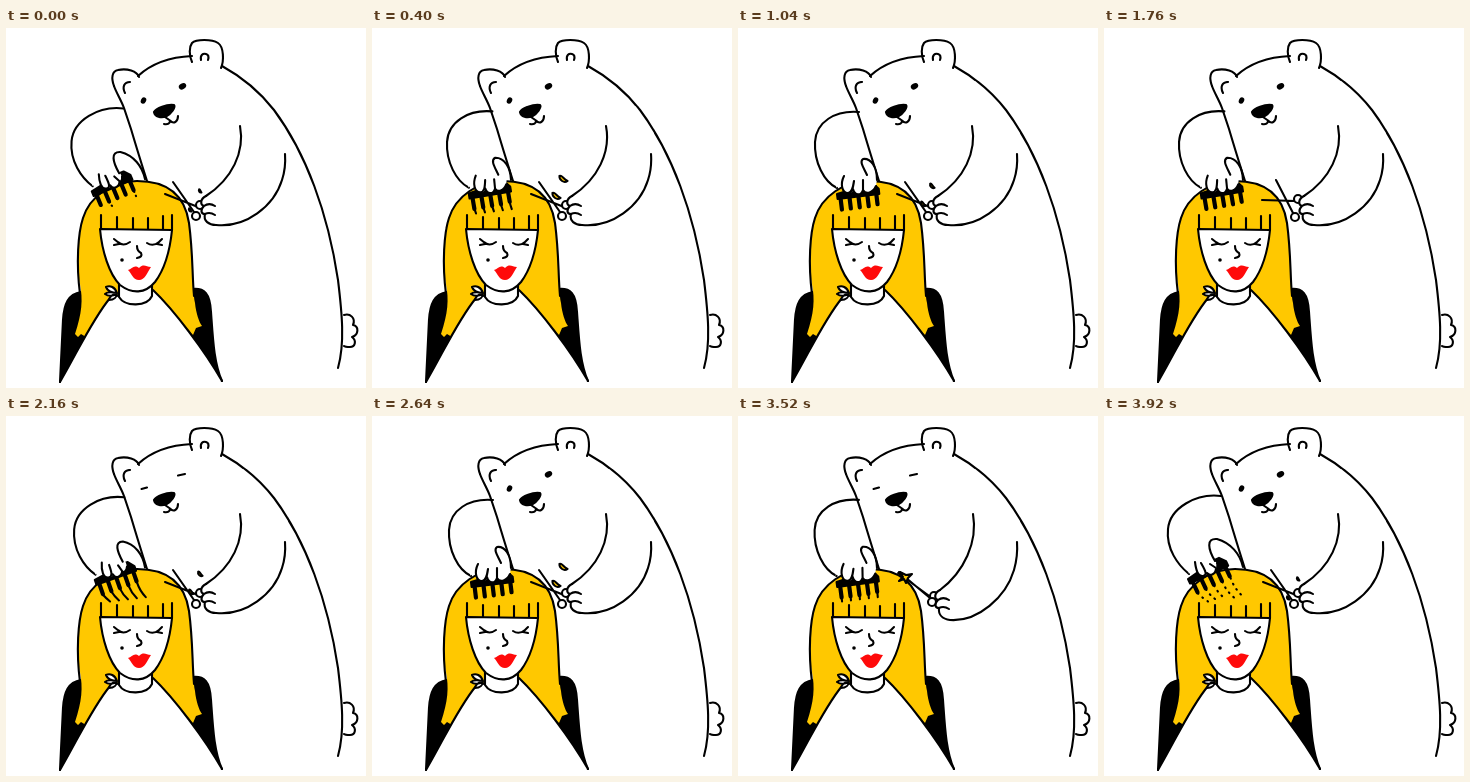
An HTML page that plays this animation: 360x360 px, repeating every 4000 ms.

```html
<!DOCTYPE html>
<html lang="en">
<head>
<meta charset="utf-8">
<title>Bear hairdresser</title>
<style>
  html, body { margin: 0; width: 100%; height: 100%; overflow: hidden; background: #fff; }
  svg { display: block; width: 100vw; height: 100vh; }
  .ink { fill: none; stroke: #000; stroke-width: 2.1; stroke-linecap: round; stroke-linejoin: round; }
  .white { fill: #fff; }
  .hair { fill: #ffc800; }
  .solid { fill: #000; }
  .bare { stroke: none; }
  .teeth { stroke-width: 4.2; }
</style>
</head>
<body>
<svg viewBox="0 0 360 360">
  <!-- bear -->
  <g class="ink">
    <path d="M133 49C131 43 121 40 112 42C106 43 105 50 108 58M119 65C116 59 118 54 124 54"/>
    <path d="M132 48C145 36 164 29 186 28"/>
    <path d="M186 34C183 27 183 19 186 15C190 11 206 11 212 15C218 19 218 33 215 40M195 32C194 27 197 25 200 26C203 27 203 29 202 32"/>
    <path d="M216 38C236 49 254 64 268 82C300 125 322 185 332 252C336 285 339 315 332 340"/>
    <path d="M338 287C344 285 350 290 347 297C353 298 353 307 346 309C351 313 349 319 344 319C341 319 339 319 338 318"/>
    <g id="open" class="solid bare">
      <ellipse cx="137.500" cy="72.500" rx="2.600" ry="3.400" transform="rotate(25 137.500 72.500)"/>
      <ellipse cx="176.500" cy="58.300" rx="3.900" ry="2.900" transform="rotate(-30 176.500 58.300)"/>
    </g>
    <path id="shut" d="M135.500 73L141 71.500M172 59.500L179 58"/>
    <path class="solid" d="M148 84C150 80 161 76 168 77C170 79 165 86 160 88.500C155 90 149 89 148 84Z"/>
    <path d="M159 89L164 92.500Q164 97 158 96M164 92.500C168 97 172 93 172 88"/>
    <path id="arm" class="white"/>
    <path d="M108 58C110 64 115 72 118 80L125 101C130 118 135 134 141 153"/>
  </g>

  <!-- customer -->
  <g class="ink">
    <path class="solid" d="M75 264C62 266 58 276 57 292L54 354L100 282ZM187 261C198 260 204 265 205 284C207 312 208 335 216 353L150 268Z"/>
    <path class="hair bare" d="M69 306C76 285 77 272 74 256C70 235 72 205 77 190C84 168 106 153 131 153C162 153 179 168 183 195C187 225 186 258 189 275C190 285 193 294 196 298L190 300L187 307L181 302L80 309L75 306L72 309Z"/>
    <path d="M74 266C70 235 72 205 77 190C84 168 106 153 131 153C162 153 179 168 183 195C187 225 186 245 188 268"/>
    <path class="white" d="M54 354C72 323 86 292 104 270L114 267L147 262C168 282 199 323 216 353"/>
    <path class="white" d="M113 256V269C119 279 141 279 146 268V256Z"/>
    <path class="white" d="M94 201C96 223 103 246 114 257C126 266 139 266 149 254C158 242 164 222 166 202Z"/>
    <path d="M95 187V201M111 189V201M127 190V201M142 190V201M157 188V201M166 187V202"/>
    <path class="white" d="M111 265C109 259 104 257 100 259C102 264 106 265 111 265C106 264 101 264 99 266C103 269 108 268 111 265C107 266 103 269 103 272C108 272 111 269 111 265"/>
    <path d="M112 214Q117 219 124 214M108 211L113 215M108 217L113 216M141 215Q147 219 153 214M156 211L152 215M156 217L151 216"/>
    <path d="M131 218Q131 223 135 225Q137 229 131 230"/>
    <circle class="solid bare" cx="116" cy="232" r="1.800"/>
    <path class="bare" fill="#ff0a0a" d="M122 242C126 241 128 236 133 240C138 235 140 239 145 239C141 245 139 252 133 252C127 252 126 246 122 242Z"/>
  </g>

  <!-- comb and combing paw -->
  <path id="trail" class="ink"/>
  <g id="comb" class="ink">
    <path class="solid" d="M0 0L12 -2L28 -6H37L42 0V5H0Z"/>
    <path class="teeth" d="M3 4V16M12 4V16M21 4V16M30 4V16M39 4V15"/>
  </g>
  <path id="paw" class="white"/>
  <path id="fingers" class="ink"/>

  <!-- scissors and cutting arm -->
  <g class="ink">
    <path id="blades"/>
    <circle id="ringA" r="4" class="white"/><circle id="ringB" r="4" class="white"/>
  </g>
  <path id="tuft" class="ink hair" d="M161 165L165 161L162 156L168 159L174 158L170 162L168 167L166 163Z"/>
  <g id="bits" class="ink hair">
    <path d="M-6 -3C-3 -6 0 0 7 1C3 6 -5 3 -6 -3Z"/><path d="M-6 -3C-3 -6 0 0 7 1C3 6 -5 3 -6 -3Z"/>
  </g>
  <g class="ink">
    <g id="grip">
      <path class="white bare" d="M199 169C193 172 194 177 198 178C194 181 195 185 199 186C197 190 201 195 209 195L214 165Z"/>
      <path d="M200 168C194 171 194 177 198 178C202 175 206 176 209 178M198 178C194 182 195 186 199 186C203 184 206 185 209 187"/>
    </g>
    <path id="sleeve"/>
  </g>
</svg>
<script>
const STEP = 80, FRAMES = 50;
const $ = id => document.getElementById(id);
const set = (id, attrs) => { for (const k in attrs) $(id).setAttribute(k, attrs[k]); };
const show = (id, on) => { $(id).style.display = on ? '' : 'none'; };
const lerp = (a, b, u) => a + (b - a) * u;

// Blend two paths that share the same commands.
function blend([a, b], u) {
  const to = b.match(/-?[\d.]+/g);
  let i = 0;
  return a.replace(/-?[\d.]+/g, n => lerp(+n, +to[i++], u).toFixed(2));
}

// Each pair: stroke start, stroke end.
const ARM = [
  'M121 84C97 82 78 94 77 114C76 134 86 154 99 160',
  'M117 80C92 77 66 92 64 113C62 133 74 149 85 158'];
const PAW = [
  'M98 160L106 148C102 156 104 165 110 165C114 165 115 163 115 161C117 168 123 168 125 162C128 167 135 165 138 158L139 151C138 139 133 130 125 131L100 138Z',
  'M85 158L91 146C92 154 94 161 99 160C104 159 102 158 103 157C106 161 112 158 112 152C113 153 114 150 113 147L111 145C104 133 102 122 113 123L80 138Z'];
const FINGERS = [
  'M106 148C102 156 104 165 110 165C114 165 115 160 116 153M115 161C117 168 123 168 125 162L125 152M125 162C128 167 135 165 138 158M139 152C139 139 133 130 125 131C121 134 126 140 129 147',
  'M91 146C92 154 94 161 99 160C104 159 101 154 97 147M103 157C106 161 112 158 112 152L106 148M112 152C113 153 114 150 113 147M139 151C136 138 127 127 113 123C102 122 104 133 111 145'];

// Each pair: scissors open, scissors closed.
const SLEEVE = [
  'M234 98C239 124 226 151 200 168M199 186C197 193 203 197 210 197C240 200 268 178 276 152Q280 140 279 126',
  'M235 98C240 126 226 156 202 174M201 192C200 199 205 203 212 204C240 206 268 181 276 154Q280 140 279 126'];

// Comb progress over its ten-step cycle: back, then a slower stroke.
const STROKE = [.88, .5, .15, 0, .03, .15, .38, .68, .9, 1];

function combPose(u) {
  return { x: lerp(99, 84, u), y: lerp(166, 163, u), a: lerp(-7, -25, u) };
}

function tip(u, i) {
  const p = combPose(u), r = p.a * Math.PI / 180, x = 3 + 9 * i, y = 17;
  return [p.x + x * Math.cos(r) - y * Math.sin(r), p.y + x * Math.sin(r) + y * Math.cos(r)];
}

function drawComb(phase) {
  const u = STROKE[phase], p = combPose(u), fading = phase === 0;
  set('arm', { d: blend(ARM, u) });
  set('paw', { d: blend(PAW, u) });
  set('fingers', { d: blend(FINGERS, u) });
  set('comb', { transform: `translate(${p.x} ${p.y}) rotate(${p.a})` });
  let d = '';
  for (let i = 0; i < 5; i++) {
    if (fading && i % 3 !== 1) continue;
    const [x, y] = tip(u, i), [X, Y] = tip(0, i);
    d += `M${x} ${y}Q${lerp(x, X, .3)} ${lerp(y, Y, .7)} ${X} ${Y + 3}`;
  }
  const dotted = fading || phase === 9;
  set('trail', { d, 'stroke-dasharray': fading ? '0 4 .5 40' : dotted ? '.8 5.5' : 'none' });
  show('trail', phase > 3 || fading);
}

// Blade tips and ring centres for each step of the cut.
const CUTS = {
  open: [159, 166, 167, 154, 194, 177, 190, 188],
  wide: [158, 172, 172, 152, 194, 171, 191, 189],
  shut: [160, 157, 161, 156, 196, 180, 194, 186]
};
const CUT_STEPS = ['open', 'wide', 'shut', 'shut', 'shut', 'open', 'open'];

// Flying bits, by steps since the snip.
const FLY_A = [[177, 150], [185, 147], [191, 151], [194, 158], [194, 163]];
const FLY_B = [[172, 158], [181, 160], [184, 168], [185, 176], [184, 182]];
const FLY_SIZE = [.8, 1, .7, .45, .3];

function drawCut(phase) {
  const pose = CUT_STEPS[phase], closed = pose === 'shut' ? 1 : 0;
  const [ax, ay, bx, by, cx, cy, dx, dy] = CUTS[pose];
  set('blades', { d: `M${ax} ${ay}L${cx - 2} ${cy + 2}M${bx} ${by}L${dx - 2} ${dy - 4}` });
  set('ringA', { cx, cy });
  set('ringB', { cx: dx, cy: dy });
  set('sleeve', { d: blend(SLEEVE, closed) });
  set('grip', { transform: `translate(${2 * closed} ${6 * closed})` });
  show('tuft', phase === 2);

  const age = (phase + 4) % 7;
  show('bits', age < 5);
  if (age > 4) return;
  [FLY_A, FLY_B].forEach((fly, i) => set2($('bits').children[i], fly[age], age * 12 - 10, FLY_SIZE[age]));
}

function set2(el, [x, y], turn, size) {
  el.setAttribute('transform', `translate(${x} ${y}) rotate(${turn}) scale(${size})`);
  el.style.strokeWidth = 2 / size;
}

const BLINKS = [7, 25, 42];

function draw(now) {
  const f = Math.floor(now / STEP) % FRAMES;
  const shut = BLINKS.some(b => f >= b && f < b + 4);
  show('shut', shut);
  show('open', !shut);
  drawComb(f % 10);
  drawCut(f % 7);
}

const start = performance.now();
function tick() {
  draw(performance.now() - start);
  requestAnimationFrame(tick);
}
tick();
</script>
</body>
</html>
```
